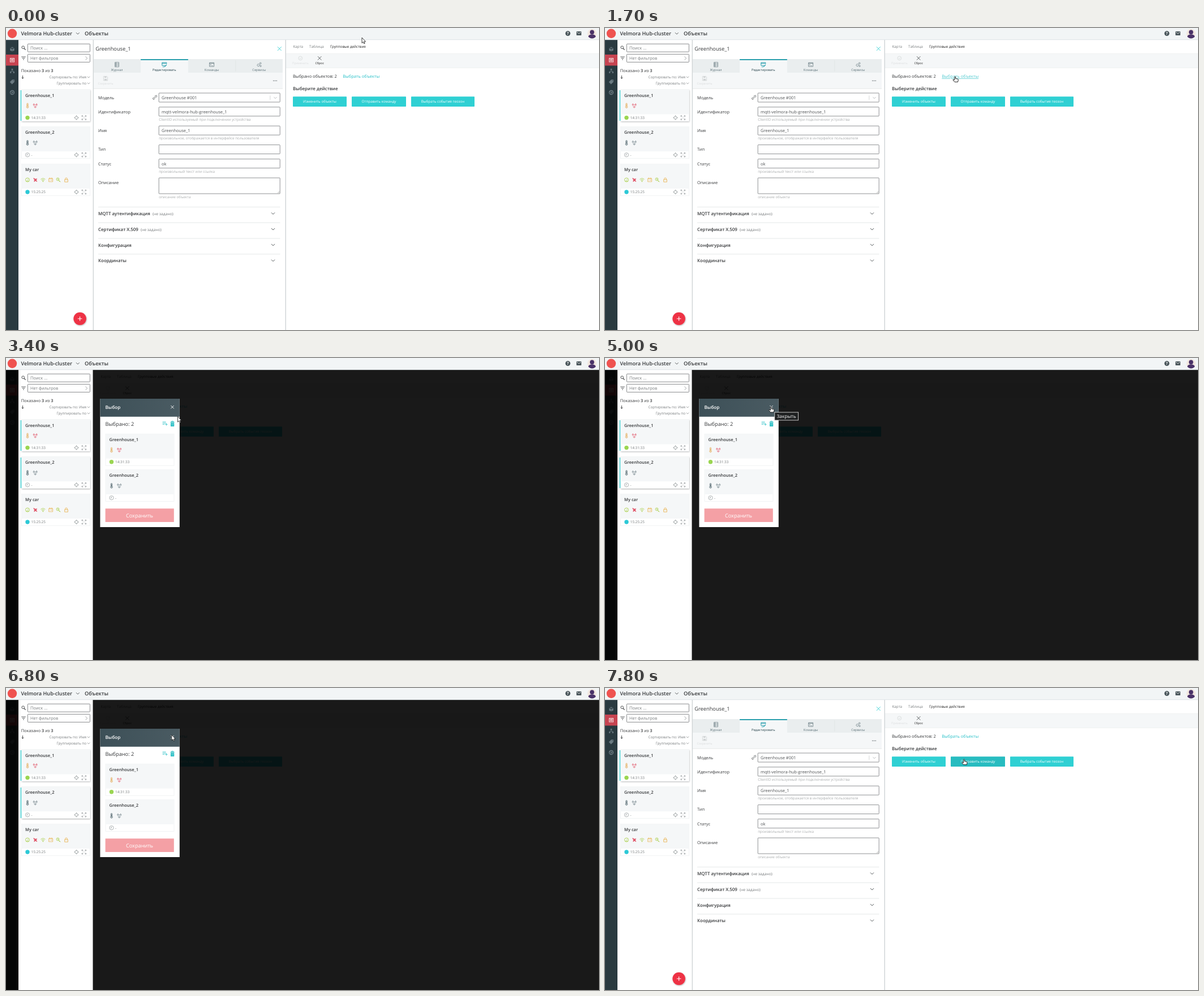
Write an HTML page that moves like this. It is 1048x534 px and loops after 8000 ms.

```html
<!DOCTYPE html>
<html lang="ru">
<head>
<meta charset="utf-8">
<style>
  html, body { margin: 0; width: 100%; height: 100%; overflow: hidden; background: #fff; }
  svg { display: block; width: 1048px; height: 534px; }
  text { font-family: "Open Sans", "Noto Sans", sans-serif; text-rendering: geometricPrecision; white-space: pre; }
</style>
</head>
<body>
<svg id="stage" viewBox="0 0 1048 534"></svg>
<script>
const TEAL = '#2fd0d3', DARK = '#37393b', GRAY = '#777b7d', PALE = '#f5f7f8', LINE = '#dfe2e3';
const LOOP = 8000, STEP = 100;

// Small SVG builders; text is placed by its vertical middle.
const rect = (x, y, w, h, fill, more = '') =>
  `<rect x="${x}" y="${y}" width="${w}" height="${h}" fill="${fill}" ${more}/>`;
const circle = (x, y, r, fill, more = '') => `<circle cx="${x}" cy="${y}" r="${r}" fill="${fill}" ${more}/>`;
const path = (d, stroke, width = 0.8, fill = 'none', more = '') =>
  `<path d="${d}" stroke="${stroke}" stroke-width="${width}" fill="${fill}" ${more}/>`;
const text = (x, y, str, size, fill = DARK, more = '') =>
  `<text x="${x}" y="${y + size * 0.36}" font-size="${size}" fill="${fill}" ${more}>${str}</text>`;
const group = (body, more = '') => `<g ${more}>${body}</g>`;
const at = (x, y, body) => group(body, `transform="translate(${x} ${y})"`);
const BOLD = 'font-weight="600"', MID = 'text-anchor="middle"', END = 'text-anchor="end"';

const chevron = (x, y, w, color, width = 0.8) => path(`M${x - w} ${y - w / 2}l${w} ${w}l${w} ${-w}`, color, width);
const cross = (x, y, r, color, width = 0.8) =>
  path(`M${x - r} ${y - r}l${2 * r} ${2 * r}m0 ${-2 * r}l${-2 * r} ${2 * r}`, color, width);

// Icons are drawn around their own centre.
const icons = {
  thermo: c => path('M-1.2 1V-3a1.2 1.2 0 0 1 2.4 0V1a1.9 1.9 0 1 1-2.4 0Z', c, 0.7, c, 'fill-opacity=".45"') + path('M0-2V2', c, 0.9),
  drops: c => [[-2.4, -2], [2.4, -2], [0, 2.2]].map(([x, y]) =>
    path(`M${x} ${y - 1.4}q2.3 2.9 0 2.9t0-2.9Z`, c, 0.8)).join('') + path('M-1 -1.2h2M-2.5 1.2l.6 1M2.5 1.2l-.6 1', c, 0.6),
  gauge: c => circle(0, 0, 3.5, 'none', `stroke="${c}" stroke-width=".8"`) + path('M0 .4L1.6-1.6M-2 1.8h4', c, 0.7),
  fan: c => path('M0 0L-3-3M0 0L3-2M0 0L-2 3M0 0L3 3', c, 1.4) + circle(0, 0, 1.7, 'none', `stroke="${c}" stroke-width=".8"`),
  wifi: c => path('M-4-1Q0-4.4 4-1M-2.6.7Q0-1.6 2.6.7M-1.2 2.2Q0 1 1.2 2.2', c, 0.8) + circle(0, 3, 0.7, c),
  battery: c => path('M-3.5-2.2h7v5.4h-7ZM-2.4-2.2v-1.2h1.4v1.2M1-2.2v-1.2h1.4v1.2M-2 .4h1.4M.7.4h1.5M1.45-.3v1.5', c, 0.7),
  key: c => circle(-1.3, -1.2, 2.4, 'none', `stroke="${c}" stroke-width=".8"`) + path('M.3.6L3.5 3.6M2 2.2l-1 1M-1.3-2.2v1.4h1.3', c, 0.9),
  lock: c => path('M-2.8-.6h5.6v4.2h-5.6ZM-1.8-.6v-1.2a1.8 1.8 0 0 1 3.6 0v1.2', c, 0.8),
  clock: c => circle(0, 0, 3.6, 'none', `stroke="${c}" stroke-width=".7"`) + path('M0-2V.2H-1.8', c, 0.7),
  target: c => circle(0, 0, 2.8, 'none', `stroke="${c}" stroke-width=".7"`) + path('M0-4.2v2.4M0 4.2v-2.4M-4.2 0h2.4M4.2 0h-2.4', c, 0.7),
  expand: c => path('M-3.7-1.7v-2h2M-3.7-3.7l2.7 2.7M3.7-1.7v-2h-2M3.7-3.7L1-1M-3.7 1.7v2h2M-3.7 3.7L-1 1M3.7 1.7v2h-2M3.7 3.7L1 1', c, 0.75),
  cube: c => path('M0-4L4-2V2.6L0 4.4L-4 2.6V-2ZM-4-2L0-.2L4-2M0-.2V4.4', '#2a3a40', 0.6, c),
  chip: c => path('M-3.5-3.2h7v6.4h-7ZM-1.4-1.2h2.8v2.4h-2.8Z', c, 1.1),
  tree: c => path('M0-1.5V1M-2.7 2V.4h5.4V2', c, 0.7) + rect(-1.3, -4, 2.6, 2.6, c) + rect(-4, 1.4, 2.4, 2.4, c) + rect(1.6, 1.4, 2.4, 2.4, c),
  tag: c => path('M-4 .6L0-3.4h3.7V.3L-.3 4.2Z', c, 0.5, c) + circle(2.2, -1.9, 0.7, '#2a3a40'),
  globe: c => circle(0, 0, 3.5, 'none', `stroke="${c}" stroke-width="1.3"`) + path('M-3-2L0 0L2-3M0 0L-1 3.4M0 0L3.4 1', c, 1),
  save: c => path('M-3.6-3.8h6l1.2 1.2v6.4h-7.2Z', c, 0.8) + rect(-2, -3.6, 3.6, 2.4, c) + rect(-2.2, 0.6, 4.4, 3, c),
  journal: c => path('M-3.4-4h6.8v8h-6.8ZM-3.4-1.4h6.8M-3.4 1.3h6.8M-1.7-4v8', c, 0.7),
  edit: c => path('M1 1.6H-4v-5.2h8v2.4M-4-2h8M-3 4h3', c, 0.9) + path('M.4 3.8L4 .2', c, 1.3),
  terminal: c => path('M-4-3.4h8v6.8h-8ZM-4-2h8M-2.6-.6l1.4 1.2l-1.4 1.2M0 2h2', c, 0.75),
  gears: c => [[-1.4, 1, 2], [2.2, -2.2, 1.4], [2.7, 2.6, 1.1]].map(([x, y, r]) =>
    circle(x, y, r, 'none', `stroke="${c}" stroke-width="1" stroke-dasharray="1.2 .35"`)).join(''),
  link: c => group(path('M-1-1.3h-2a1.4 1.4 0 0 0 0 2.8h2M1-1.3h2a1.4 1.4 0 0 1 0 2.8h-2M-2 .1h4', c, 0.9), 'transform="rotate(-45)"'),
};
const icon = (name, x, y, color) => at(x, y, icons[name](color));

function card(x, y, { title, marks, dot, time }, tools) {
  const tint = '#8c9294';
  let s = rect(x, y, 121, 56, '#fff', 'stroke="#eceeef" stroke-width=".7"') + rect(x, y, 121, 43.5, PALE);
  s += text(x + 6.5, y + 10, title, 7.5, DARK, BOLD);
  marks.forEach(([name, color], i) => s += icon(name, x + 10.5 + i * 13.7, y + 28.2, color));
  s += dot ? circle(x + 10.5, y + 49.6, 3.7, dot) : icon('clock', x + 10.5, y + 49.6, tint);
  s += text(x + 17, y + 49.6, time, 6.4, GRAY);
  if (tools) s += icon('target', x + 97, y + 49.6, tint) + icon('expand', x + 110.3, y + 49.6, tint);
  return s;
}
const marked = (y, id) => group(
  rect(27.5, y, 121, 56, '#fff', 'filter="url(#shade)"') + rect(25.8, y + 1, 2.4, 54, TEAL), `id="${id}"`);

const lime = '#a4cc3d', orange = '#e8ad3f', red = '#e04a5f', slate = '#5d7078';
const items = [
  { title: 'Greenhouse_1', marks: [['thermo', '#e5b46b'], ['drops', red]], dot: '#9ad551', time: '14:31:33' },
  { title: 'Greenhouse_2', marks: [['thermo', slate], ['drops', slate]], time: '-' },
  { title: 'My car', marks: [['gauge', lime], ['fan', red], ['wifi', lime], ['battery', orange], ['key', lime], ['lock', orange]], dot: '#2cc9d6', time: '15:25:25' },
];

function sidebar() {
  const tint = '#6b7b82';
  return rect(0, 21, 22, 513, '#2a3a40') + rect(0, 47, 22, 19.5, '#c74451') +
    icon('cube', 11, 37.3, tint) + icon('chip', 11, 56.8, '#f3d9dc') + icon('tree', 11, 76, tint) +
    icon('tag', 11, 95, tint) + icon('globe', 11, 114, tint);
}

function listPanel() {
  const box = 'stroke="#6c6f71" stroke-width=".8" rx=".8"';
  return rect(22, 21, 131.5, 513, '#fff') +
    circle(30.2, 34.2, 2.3, 'none', `stroke="${DARK}" stroke-width=".9"`) + path('M31.9 36l2.7 2.7', DARK, 1.1) +
    rect(38.4, 28.2, 110, 14, '#fff', box) + text(43, 35.4, 'Поиск ...', 7.5, GRAY) +
    path('M27.2 51h7.6M28.6 53.4h4.8M30 55.8h2', DARK, 0.8) +
    rect(38.4, 46.4, 110, 14, '#fff', box) + text(43, 53.6, 'Нет фильтров', 7.3, GRAY) +
    path('M140.6 50.4l3 3.1l-3 3.1', GRAY, 0.7) +
    text(26.7, 75, `Показано <tspan ${BOLD}>3</tspan> из <tspan ${BOLD}>3</tspan>`, 7.35) +
    path('M29.5 84v5.4M27.8 87.5l1.7 2l1.7-2', DARK, 0.9) +
    text(142, 86.7, 'Сортировать по: Имя', 6.3, GRAY, END) + chevron(146, 86.8, 2.2, GRAY, 0.7) +
    text(142, 97.6, 'Группировать по', 6.3, GRAY, END) + chevron(146, 97.7, 2.2, GRAY, 0.7) +
    marked(109, 'mark1') + marked(175, 'mark2') +
    items.map((item, i) => card(27.5, 109 + i * 65.7, item, true)).join('') ;
}

function editor() {
  const field = (y, h, label, value = '', hint = '') =>
    text(163, y + 8.2, label, 7.4) +
    rect(270.2, y, 214, h, '#fff', 'stroke="#747779" stroke-width=".8" rx=".8"') +
    text(275, y + 8.2, value, 7.5, '#505355') + text(270.2, y + h + 6, hint, 6.27, '#a9acad');
  const fold = (y, title, note = '') =>
    path(`M163 ${y - 11.7}H484.5`, LINE, 0.8) + text(163, y, title, 7.9, DARK, BOLD) +
    text(note === '' ? 0 : title.startsWith('M') ? 259 : 238, y + 0.4, note, 6.75, GRAY) + chevron(472, y - 0.4, 3, '#505658', 1);
  const tabs = [['journal', 'Журнал'], ['edit', 'Редактировать'], ['terminal', 'Команды'], ['gears', 'Сервисы']];
  let s = rect(153.5, 21, 341, 513, '#fff') +
    text(158.3, 36.3, 'Greenhouse_1', 9.25) + cross(483.3, 36.6, 3.4, TEAL, 0.9) +
    rect(155, 55, 334, 24, '#eaeeef') + rect(155, 79, 334, 28, PALE) + path('M155 107.2H489', LINE, 0.8);
  tabs.forEach(([name, label], i) => {
    const x = 154.3 + i * 83.8, on = i === 1;
    if (on) s += rect(x, 55, 83.8, 24, PALE) + rect(x, 55, 83.8, 1.8, '#1797a6');
    else if (i === 3) s += path(`M${x} 57v20`, LINE, 0.7);
    s += icon(name, x + 41.7, 64.7, on ? '#1797a6' : '#60747b') + text(x + 41.7, 74.3, label, 5.7, on ? '#213e46' : '#60747b', MID);
  });
  s += icon('save', 176, 89.2, '#d0d3d4') + text(176, 98.6, 'Сохранить', 5.2, '#d9dbdc', MID);
  [472.8, 475.5, 478.2].forEach(x => s += circle(x, 93.2, 0.75, '#50585b'));
  s += icon('link', 263, 122.6, '#5c6062') +
    field(115, 16, 'Модель', 'Greenhouse #001') + path('M466.8 119.5v7.5', '#c4c7c8', 0.7) + chevron(476, 123.4, 2.6, '#a7abac') +
    field(139.8, 16, 'Идентификатор', 'mqtt-velmora-hub-greenhouse_1', 'ClientID используемый при подключении устройства') +
    field(173.2, 16, 'Имя', 'Greenhouse_1', 'произвольное, отображается в интерфейсе пользователя') +
    field(206.6, 16, 'Тип') +
    field(231.7, 16, 'Статус', 'ok', 'произвольный текст или ссылка') +
    field(265, 28, 'Описание', '', 'описание объекта') + path('M480 292l3.4-3.4M482 292l1.4-1.4', '#777', 0.5) +
    fold(328.3, 'MQTT аутентификация', '(не задано)') + fold(356, 'Сертификат X.509', '(не задано)') +
    fold(383.8, 'Конфигурация') + fold(411.5, 'Координаты');
  return s + path('M154.3 21V534', '#cfd4d6', 1.4) + path('M494.2 21V534', '#cfd4d6', 1.4) +
    circle(130.6, 514, 11.3, '#ee3344', 'filter="url(#shade)"') + path('M126.8 514h7.6M130.6 510.2v7.6', '#fff', 1.1);
}

function actions() {
  const button = (x, w, label, id) => rect(x, 121.3, w, 17.7, TEAL, `id="${id}" rx=".8"`) +
    text(x + w / 2, 130.2, label, 6.3, '#fff', MID);
  return rect(494.8, 21, 900, 513, '#fff') + rect(494.8, 45.5, 900, 24.7, PALE) +
    path('M494.8 45.3h900M494.8 70.4h900', '#eaeced', 0.7) +
    text(507.5, 32.3, 'Карта', 6.3, GRAY) + text(536, 32.3, 'Таблица', 6.3, GRAY) + text(573, 32.3, 'Групповые действия', 6.25, '#222') +
    circle(520.3, 53.4, 3.4, 'none', 'stroke="#d5d8d9" stroke-width=".8"') + path('M518.8 53.4l1.2 1.3l2-2.4', '#d5d8d9') +
    text(520.3, 62.4, 'Применить', 5.2, '#dcdedf', MID) + cross(554.2, 53.4, 3.2, '#4b5052', 0.9) + text(554.2, 62.3, 'Сброс', 5.3, '#222', MID) +
    text(507, 85.3, 'Выбрано объектов: 2', 7.5) + text(595.3, 85.3, 'Выбрать объекты', 7.45, '#25bfc7', 'id="link"') +
    text(507, 107, 'Выберите действие', 7.95, DARK, BOLD) +
    button(507, 95, 'Изменить объекты', 'b1') + button(611, 96, 'Отправить команду', 'b2') + button(716, 112, 'Выбрать события геозон', 'b3');
}

function topBar() {
  const ink = '#4a565b';
  return rect(0, 0, 1048, 21, '#f2f5f6') + path('M0 20.7H1048', '#d9dfe1', 0.8) +
    circle(11, 9.8, 8.2, '#ef5350') +
    text(26.5, 10, 'Velmora Hub-cluster', 9.15, DARK, BOLD) + chevron(126.8, 9.6, 2.9, DARK, 0.8) +
    text(139, 10, 'Объекты', 9.2, DARK, BOLD) +
    circle(993, 9.6, 4.4, ink) + text(993, 9.8, '?', 7, '#fff', `${MID} font-weight="700"`) +
    rect(1008.2, 6.1, 8.6, 7, ink, 'rx=".8"') + path('M1009 7.2l3.5 2.8l3.5-2.8', '#fff', 0.8) +
    circle(1035.7, 10, 8.2, '#f3e8e0') + circle(1035.7, 7.4, 3.8, '#4a3268') +
    path('M1029 15q1.2-3.8 6.7-3.8t6.7 3.8a8.2 8.2 0 0 1-13.4 0Z', 'none', 0, '#4a3268');
}

function dialog() {
  return rect(166.4, 72, 140.4, 227, '#fff') + rect(166.4, 72, 140.4, 31.8, 'url(#head)') +
    text(175.5, 87, 'Выбор', 8.1, '#fff', BOLD) + cross(294, 86.7, 2.7, '#fff', 0.9) +
    text(175.5, 116.7, 'Выбрано: 2', 9.2) +
    path('M276.6 113h6M276.6 115.2h6M276.6 117.4h3.6M281.2 117.4h4.4M283.4 115.2v4.4', '#43c8cd', 0.9) +
    path('M290.4 113.4h7.4M292.6 113.2v-1.4h3v1.4', '#2bbfc5', 1) + rect(291, 114.4, 6.2, 6.6, '#2bbfc5', 'rx=".6"') +
    path('M293 115.8v3.8M295.2 115.8v3.8', '#a5e6e8', 0.6) +
    card(176, 134.2, items[0]) + card(176, 197.6, items[1]) +
    rect(175.6, 266.2, 121.2, 23.8, '#f4a0a5') + text(236, 278.2, 'Сохранить', 9.2, '#fff', MID);
}

const arrow = path('M0 0V9.6L2.2 7.6L3.7 10.8L5.2 10.1L3.8 7H6.6Z', '#111', 0.8, '#fff', 'id="arrow" stroke-linejoin="round"');
const hand = path('M-.9.6Q0-.6.9.6V3.6L4.6 4.3Q5.8 4.6 5.6 6L4.8 9.6H-.8L-3.6 6.2Q-3.9 5-2.6 5.2L-.9 6.2Z', '#111', 0.9, '#fff', 'id="hand" stroke-linejoin="round"');

document.getElementById('stage').innerHTML =
  `<defs><filter id="shade" x="-20%" y="-20%" width="140%" height="150%"><feDropShadow dx=".6" dy="1" stdDeviation="1.3" flood-opacity=".32"/></filter>
   <linearGradient id="head"><stop stop-color="#3d5058"/><stop offset="1" stop-color="#4a5b62"/></linearGradient></defs>` +
  group(actions(), 'id="actions"') + sidebar() + rect(0, 21, 1048, 513, '#000', 'id="dim" opacity=".9"') +
  listPanel() + group(editor(), 'id="editor"') + topBar() + group(dialog(), 'id="dialog"') +
  group(rect(299.8, 96, 41.8, 14, '#1d1f20', 'stroke="#d8d8d8" stroke-width=".9"') + text(320.6, 102.9, 'Закрыть', 8.4, '#fff', MID), 'id="tip"') +
  group(arrow + hand, 'id="cursor"');

// Pointer stops: time, x, y.
const stops = [
  [100, 629, 17], [900, 618.7, 85.8], [1700, 618.7, 85.8], [1800, 619.5, 87], [2300, 619.5, 87], [2400, 619.5, 87.6],
  [2500, 619.5, 88], [3000, 321, 136], [3100, 321, 136], [3600, 294, 86], [5000, 293.3, 86.3],
  [5700, 175, 270], [6100, 175, 270], [6800, 292.8, 83], [7000, 292.8, 83], [7200, 500, 54],
  [7400, 632, 78], [7500, 632, 78], [7800, 634.5, 126],
];
function pointer(t) {
  if (t <= stops[0][0]) return stops[0].slice(1);
  const i = stops.findIndex(s => s[0] >= t);
  if (i < 0) return stops[stops.length - 1].slice(1);
  const [t0, x0, y0] = stops[i - 1], [t1, x1, y1] = stops[i];
  const k = (t - t0) / (t1 - t0), e = k * k * (3 - 2 * k);
  return [x0 + (x1 - x0) * e, y0 + (y1 - y0) * e];
}

const el = id => document.getElementById(id);
const show = (id, on) => el(id).setAttribute('display', on ? 'inline' : 'none');
const inside = (x, y, x0, y0, x1, y1) => x >= x0 && x <= x1 && y >= y0 && y <= y1;

function markLevel(t) {
  if (t < 1800 || t >= 7100) return 0;
  if (t < 1900) return 0.3;
  return t < 6900 ? 1 : t < 7000 ? 0.75 : 0.35;
}

function render(time) {
  const t = Math.floor(time % LOOP / STEP) * STEP;
  const open = t >= 1800 && t < 6900;
  const [x, y] = pointer(t);
  const onLink = !open && inside(x, y, 595, 80.5, 659, 91);
  const onButton = !open && inside(x, y, 611, 121, 707, 139);
  const onClose = open && t < 6800 && inside(x, y, 289, 82, 299, 91);
  const isHand = onLink || onButton || onClose;

  ['dim', 'dialog'].forEach(id => show(id, open));
  show('editor', !open);
  el('actions').setAttribute('transform', `translate(${open ? -340 : 0} 0)`);
  el('mark2').setAttribute('opacity', markLevel(t));
  el('link').setAttribute('text-decoration', onLink ? 'underline' : 'none');
  el('link').setAttribute('fill', onLink ? '#4fc9cf' : '#25bfc7');
  el('b2').setAttribute('fill', onButton ? '#27bcc0' : TEAL);
  show('tip', t >= 5000 && t < 5200);
  show('hand', isHand);
  show('arrow', !isHand);
  el('cursor').setAttribute('transform', `translate(${x} ${y})`);
}

const start = performance.now();
function tick() {
  render(performance.now() - start);
  requestAnimationFrame(tick);
}
tick();
</script>
</body>
</html>
```
